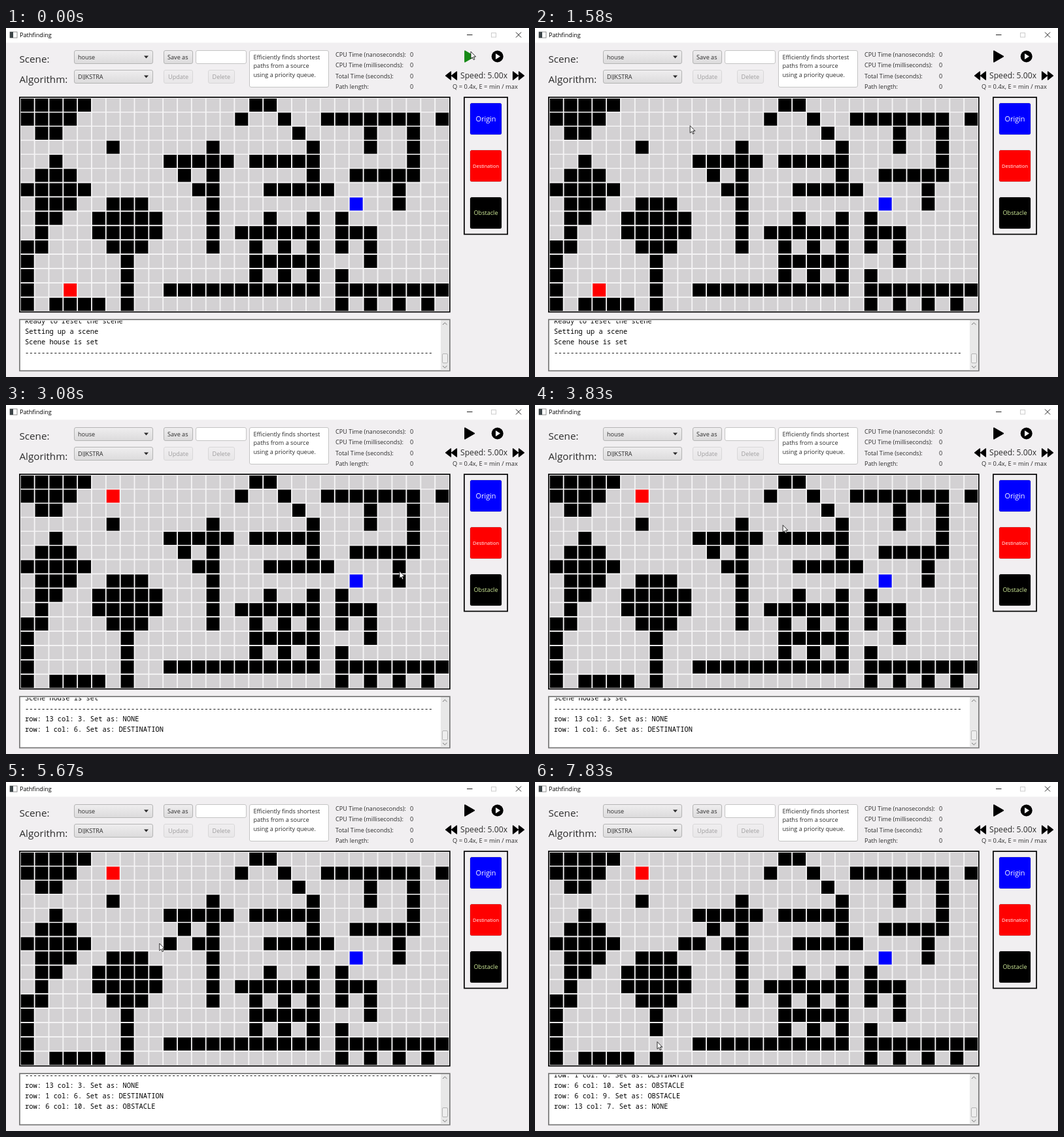
These frames come from a looping animation (800 by 534 pixels, 8000 ms). An HTML page:

```html
<!DOCTYPE html>
<html lang="en">
<head>
<meta charset="utf-8">
<title>Pathfinding</title>
<style>
  html, body { margin: 0; width: 100%; height: 100%; overflow: hidden; background: #f1eff1; }
  svg { display: block; width: 800px; height: 534px; }
  text { font-family: "Open Sans", "Noto Sans", sans-serif; white-space: pre; }
  #log text { font-family: "Noto Sans Mono", "DejaVu Sans Mono", monospace; }
</style>
</head>
<body>
<svg id="stage" viewBox="0 0 800 534" xmlns="http://www.w3.org/2000/svg">
  <defs>
    <linearGradient id="face" x2="0" y2="1">
      <stop offset="0" stop-color="#efeeef"/><stop offset="1" stop-color="#dcdbdc"/>
    </linearGradient>
    <clipPath id="logClip"><rect x="22" y="448" width="643" height="75"/></clipPath>
  </defs>
  <rect width="800" height="534" fill="#f1eff1"/>
  <rect width="800" height="22.5" fill="#fff"/>
  <g id="ui"></g>
  <path id="play" d="M702 35.2V51.8L716.3 43.5Z" stroke-width="1.8" stroke-linejoin="round"/>
  <g id="grid"></g>
  <g id="log" clip-path="url(#logClip)"></g>
  <path id="cursor" d="M0 0V11L2.5 8.7L4.2 12.6L6 11.9L4.3 8H7.7Z"
        fill="#fff" stroke="#000" stroke-width=".8"/>
</svg>
<script>
const LOOP = 8000, STEP = 1000 / 12;
const COLS = 30, ROWS = 15;
const SMALL = 9.12;
const $ = id => document.getElementById(id);

function add(parent, tag, attrs, content) {
  const node = document.createElementNS("http://www.w3.org/2000/svg", tag);
  for (const key in attrs) node.setAttribute(key, attrs[key]);
  if (content !== undefined) node.textContent = content;
  parent.appendChild(node);
  return node;
}

const ui = $("ui");
const rect = (x, y, width, height, attrs) => add(ui, "rect", { x, y, width, height, ...attrs });
const path = (d, attrs) => add(ui, "path", { d, ...attrs });
const label = (x, y, string, size = SMALL, attrs = {}) =>
  add(ui, "text", { x, y, "font-size": size, fill: "#2b2b2b", ...attrs }, string);

function button(x, y, width, string, textX, opacity = 1) {
  rect(x + .5, y + .5, width - 1, 20, { rx: 2.5, fill: "url(#face)", stroke: "#b4b4b4", opacity });
  label(textX, y + 13.8, string, SMALL, { opacity });
}

function combo(y, string) {
  button(104, y, 121, string, 110);
  path(`M211 ${y + 8.5}h7l-3.5 4Z`, { fill: "#2b2b2b" });
}

function drawWindow() {
  rect(6, 6, 11, 9, { fill: "#fff", stroke: "#777", "stroke-width": .8 });
  rect(6, 6, 5, 9, { fill: "#3c4548" });
  label(21, 13.7, "Pathfinding", SMALL, { fill: "#000" });
  path("M705 10.5h8.5M780 6.5l8 8m0-8l-8 8", { stroke: "#222", fill: "none" });
  rect(742.5, 7.5, 7, 6.5, { fill: "none", stroke: "#ccc" });
}

function drawControls() {
  label(20.5, 53.4, "Scene:", 15.2);
  label(20.5, 83.6, "Algorithm:", 15.2);
  combo(34, "house");
  combo(64, "DIJKSTRA");
  button(241, 34, 45, "Save as", 247);
  button(241, 64, 45, "Update", 248, .4);
  button(309, 64, 41, "Delete", 315.5, .4);
  rect(290.5, 34.5, 77, 20, { rx: 2.5, fill: "#fff", stroke: "#c4c4c4" });
  rect(372.5, 34.5, 121, 56, { rx: 2.5, fill: "#fff", stroke: "#c4c4c4" });
  ["Efficiently finds shortest", "paths from a source", "using a priority queue."]
    .forEach((line, i) => label(378.5, 47.5 + i * 13.8, line));
  ["CPU Time (nanoseconds):", "CPU Time (milliseconds):", "Total Time (seconds):", "Path length:"]
    .forEach((line, i) => {
      label(504, 44.1 + i * 16.35, line);
      label(618, 44.1 + i * 16.35, "0");
    });
}

function drawPlayer() {
  add(ui, "circle", { cx: 751.7, cy: 43.5, r: 9 });
  path("M749 39v9l7-4.5Z", { fill: "#fff" });
  const solid = { "stroke": "#000", "stroke-width": 1.2, "stroke-linejoin": "round" };
  path("M680.5 66.8v12.4l-8-6.2ZM689.5 66.8v12.4l-8-6.2Z", solid);
  path("M775.5 66.8v12.4l8-6.2ZM784.5 66.8v12.4l8-6.2Z", solid);
  label(695, 77.1, "Speed: 5.00x", 12.17);
  label(733, 93.4, "Q = 0.4x, E = min / max", 9.4, { "text-anchor": "middle" });
}

function drawPalette() {
  rect(700.9, 106.1, 66.2, 209.5, { fill: "none", stroke: "#000", "stroke-width": 1.7 });
  [["Origin", "#00f", 10.9, "#fff"], ["Destination", "#f00", 7.45, "#fff"], ["Obstacle", "#000", 9.1, "#d4f09c"]]
    .forEach(([name, fill, size, color], i) => {
      const y = 115 + i * 72;
      rect(710, y, 48, 48, { rx: 2.5, fill, stroke: "#000", "stroke-opacity": .4, "stroke-width": .8, "stroke-dasharray": "1 1" });
      label(734, y + 24 + size * .36, name, size, { fill: color, "text-anchor": "middle" });
    });
}

function drawPanels() {
  rect(20.9, 106, 658, 328.5, { fill: "#f5f4f5", stroke: "#000", "stroke-width": 1.7 });
  rect(20.9, 446.1, 658, 78.4, { fill: "#fff", stroke: "#777", "stroke-width": 1.7 });
  rect(665, 447, 13, 76.5, { fill: "#e8e8e8" });
  rect(667.5, 498.5, 8, 14, { rx: 1.5, fill: "#eee", stroke: "#b4b4b4" });
  path("M668 454l3.3-3l3.3 3M668 517l3.3 3l3.3-3", { fill: "none", stroke: "#777" });
}

// Obstacle columns for each row
const WALLS = [
  "0-4 16-17", "0-3 15 18 21-27 29", "1-2 19 24 27", "6 13 20 24 27", "2 10-14 16-20 27",
  "1-3 11 13 20 23-27", "0-4 12-13 17-21 26", "1-3 6-8 13 26", "1-2 5-9 13 17 20 22",
  "1 5-9 13 15-20 22-24", "0-1 6-8 13 16 18 20 22 24", "0 7 16-20 24", "0 7 16 18 20 22",
  "0 7 10-20 22-29", "0 2-5 7 22 24 26 28"
];
const COLORS = { NONE: "#d3d1d3", OBSTACLE: "#000", ORIGIN: "#00f", DESTINATION: "#f00" };

const startKinds = Array(ROWS * COLS).fill("NONE");
WALLS.forEach((spans, row) => spans.split(" ").forEach(span => {
  const [from, to = from] = span.split("-").map(Number);
  startKinds.fill("OBSTACLE", row * COLS + from, row * COLS + to + 1);
}));
startKinds[7 * COLS + 23] = "ORIGIN";
startKinds[13 * COLS + 3] = "DESTINATION";

// The layout makes the leading tracks slightly narrower than the rest
const PITCH = 21.92;
const track = (i, start, narrow, count) => start + Math.min(i, count) * narrow + Math.max(0, i - count) * PITCH;

const cells = startKinds.map((_, i) => add($("grid"), "rect", {
  x: track(i % COLS, 22.7, 21.84, 15), y: track(Math.floor(i / COLS), 108, 21.5, 5), width: 20, height: 20
}));

const EDITS = [
  { at: 1910, row: 13, col: 3, kind: "NONE" },
  { at: 1910, row: 1, col: 6, kind: "DESTINATION" },
  { at: 5325, row: 6, col: 10, kind: "OBSTACLE" },
  { at: 5995, row: 6, col: 9, kind: "OBSTACLE" },
  { at: 7575, row: 13, col: 7, kind: "NONE" }
];
const START_LOG = ["Ready to reset the scene", "Setting up a scene", "Scene house is set", "-".repeat(100)];
const logLines = START_LOG.map((_, i) =>
  add($("log"), "text", { x: 29, y: 452.2 + i * 16, "font-size": 10.4, fill: "#000" }));

// Pointer stops: time, x, y
const POINTER = [
  [0, 711, 36], [80, 712, 39], [330, 723, 110], [670, 728, 205], [830, 727.5, 216.5],
  [1000, 715, 214], [1300, 470, 184], [1670, 166, 139], [1917, 166, 139], [2330, 203, 160],
  [2750, 309, 186], [3000, 540, 240], [3250, 726, 283], [3417, 726, 283], [3580, 620, 250],
  [3830, 380, 183.5], [4150, 300, 208], [4580, 260, 240], [5000, 252, 247], [5330, 250, 247],
  [5750, 231, 247], [6000, 231, 247], [6170, 230, 248], [6417, 230, 248], [6670, 220.5, 266.5],
  [6920, 197, 350], [7250, 187, 397.5], [LOOP, 187, 397.5]
];

function pointerAt(time) {
  const i = Math.max(1, POINTER.findIndex(stop => stop[0] >= time));
  const [t0, x0, y0] = POINTER[i - 1], [t1, x1, y1] = POINTER[i];
  const k = (time - t0) / (t1 - t0);
  return [x0 + (x1 - x0) * k, y0 + (y1 - y0) * k];
}

function render(now) {
  const time = Math.floor((now % LOOP + 5) / STEP) * STEP % LOOP;
  const [x, y] = pointerAt(time);
  $("cursor").setAttribute("transform", `translate(${x} ${y})`);

  const playColor = y < 52 ? "#178a17" : "#000";
  $("play").setAttribute("fill", playColor);
  $("play").setAttribute("stroke", playColor);

  const kinds = startKinds.slice(), log = START_LOG.slice();
  for (const { at, row, col, kind } of EDITS) {
    if (time < at) break;
    kinds[row * COLS + col] = kind;
    log.push(`row: ${row} col: ${col}. Set as: ${kind}`);
  }
  cells.forEach((cell, i) => cell.setAttribute("fill", COLORS[kinds[i]]));
  log.slice(-4).forEach((line, i) => { logLines[i].textContent = line; });
}

drawWindow();
drawControls();
drawPlayer();
drawPalette();
drawPanels();

const start = performance.now();
function frame() {
  render(performance.now() - start);
  requestAnimationFrame(frame);
}
frame();
</script>
</body>
</html>
```
